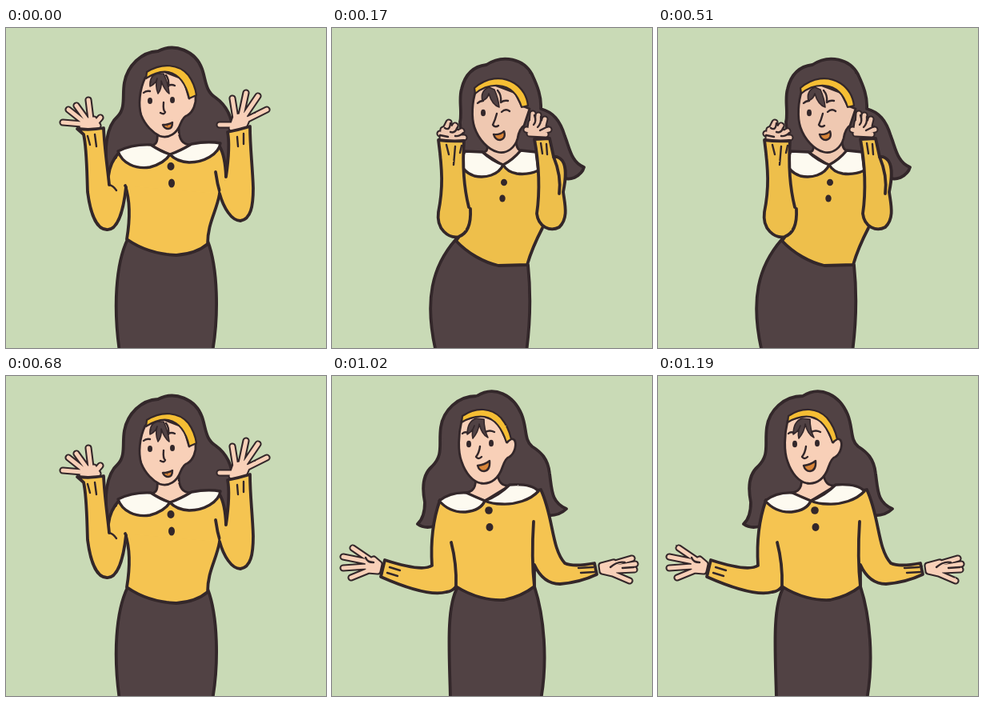
Write an HTML page that moves like this. It is 400 px wide and 400 px high and loops after 1360 ms.

```html
<!DOCTYPE html>
<html lang="en">
<head>
<meta charset="utf-8">
<title>Waving woman</title>
<style>
  html, body { margin: 0; height: 100%; overflow: hidden; background: #c9dab6; }
  svg { display: block; width: 100vw; height: 100vh; }
  path { stroke: #33272a; stroke-width: 3.8; stroke-linecap: round; stroke-linejoin: round; fill: none; }
  .dark { fill: #514244; }
  .yellow { fill: #f5c451; }
  .skin { fill: #f8d0b8; stroke-width: 2.8; }
  .collar { fill: #fdfaf0; stroke-width: 3.4; }
  .band { fill: #f5be34; stroke-width: 2.2; }
  .bangs { fill: #514244; stroke-width: 1.6; }
  .mouth { fill: #d98538; stroke-width: 2.4; }
  .thin { stroke-width: 2.4; }
  .plain { stroke: none; }
  .dot { fill: #33272a; stroke: none; }
  .finger { fill: #33272a; stroke-width: 9.2; }
  .flesh { fill: #f8d0b8; stroke: #f8d0b8; stroke-width: 5; }
  .muted .yellow { fill: #eebf4b; }
  .muted .skin, .muted .flesh { fill: #efc8b1; }
  .muted .flesh { stroke: #efc8b1; }
</style>
</head>
<body>
<svg viewBox="0 0 400 400">
  <filter id="rough" filterUnits="userSpaceOnUse" x="-10" y="-10" width="420" height="430" color-interpolation-filters="sRGB">
    <feTurbulence id="grain" type="fractalNoise" baseFrequency=".2" numOctaves="2" seed="1"/>
    <feDisplacementMap in="SourceGraphic" scale="1.4" xChannelSelector="R" yChannelSelector="G"/>
  </filter>
  <g id="stage" filter="url(#rough)"></g>
</svg>
<script>
const shape = (type, d) => `<path class="${type}" d="${d}"/>`;
const hand = d => shape('finger', d) + shape('flesh', d);
const dot = (x, y, rx, ry = rx) => `<ellipse class="dot" cx="${x}" cy="${y}" rx="${rx}" ry="${ry}"/>`;

const openHands = [
  shape('dark', 'M190 29C169 30 152 47 148 68C145 84 150 99 140 110C126 122 121 150 128 188L274 190L283 130C283 108 273 95 262 87C249 79 250 65 245 51C237 29 211 18 190 29Z'),
  shape('skin', 'M189 128C190 141 189 146 181 147L206 159L231 146C221 146 216 140 216 126Z'),
  shape('skin', 'M174 62C167 77 165 96 169 109C174 122 184 131 192 135C204 139 214 131 218 120Q222 110 227 109C234 105 238 94 237 85Q232 81 229 88L222 64L196 54Z'),
  shape('band', 'M176 55C195 43 216 45 228 59Q236 70 238 84L229 88C225 70 216 58 203 55Q190 53 175 63Z'),
  shape('bangs', 'M189 57Q179 60 180 73Q187 70 189 63Q186 72 190 82Q195 76 194 66Q198 78 204 82Q203 70 197 57Z'),
  shape('thin', 'M200 59Q204 64 203 73M172 81Q175 78 180 79M203 72Q207 70 211 72M197 93Q196 103 199 105Q198 109 193 106'),
  dot(180, 91, 3, 4), dot(208, 90, 3, 4),
  shape('mouth', 'M196 121Q203 121 208 118Q208 126 203 126Q198 126 196 121Z'),
  shape('dark', 'M152 264C137 295 134 350 142 405H258C266 360 265 300 252 266Z'),
  shape('yellow plain', 'M141 156Q131 168 129 186L130 204L151 202L267 208L275 187Q273 160 267 148L205 160Z'),
  shape('yellow', 'M149 197C155 215 155 240 151 264C168 276 190 283 213 284Q238 282 252 270C252 244 263 230 267 207'),
  shape('', 'M141 156Q130 168 128 185M267 148Q274 160 275 186M262 180Q264 195 268 208'),
  shape('collar', 'M205 158Q198 169 180 174C162 177 145 169 140 154Q158 145 181 146Q193 154 205 158Z'),
  shape('collar', 'M205 158Q217 154 232 145Q252 141 268 144C266 158 247 168 229 168Q213 167 205 158Z'),
  dot(206, 173, 4.5, 5), dot(207, 194, 4, 5.5),
  hand('M95 120L71 118M97 117L78 102M101 115L88 97M106 114L103 90M112 119L118 112M95 123L101 115L110 114L115 122Z'),
  hand('M284 121L267 121M287 113L283 88M294 109L300 81M298 110L315 85M300 115L326 102M282 125L287 111L297 109L301 115L298 122Z'),
  shape('yellow', 'M150 199C147 227 140 253 126 252C112 252 105 228 102 205C101 178 101 150 97 133L89 126Q106 128 122 125C123 150 127 175 129 196'),
  shape('yellow', 'M267 207C272 225 282 241 293 241C306 239 309 223 309 200C308 170 305 150 305 123Q292 127 277 130C280 145 278 165 275 186'),
  shape('thin', 'M129 196Q134 197 138 203M102 135L105 146M111 133L113 148M289 136L290 148M297 132L297 145')
].join('');

const wink = [
  shape('dark', 'M193 46C176 48 166 59 162 76C158 90 163 104 160 118L163 160L280 164L287 185Q293 191 303 187Q313 182 315 174C299 168 297 150 291 135C285 115 276 105 261 101C262 86 257 73 250 58C240 39 214 32 193 46Z'),
  shape('skin', 'M192 138Q198 156 188 155L214 172L238 154Q230 153 230 140Z'),
  shape('skin', 'M180 78C175 92 174 112 178 124C183 139 195 152 207 155C219 158 229 149 232 138Q234 126 240 122L247 101L237 97L229 81L200 70Z'),
  shape('band', 'M178 75C193 62 212 59 228 69Q243 79 245 97L237 99C232 82 222 73 208 72Q192 71 179 82Z'),
  shape('bangs', 'M196 74Q185 79 188 91Q195 88 196 82Q200 96 209 99Q208 88 203 77Z'),
  shape('thin', 'M207 78Q212 84 211 92M182 94Q185 91 189 91M211 93Q215 90 220 91M206 107Q204 115 201 121Q204 125 208 122M212 105Q217 100 222 104'),
  dot(189, 106, 3, 4.3),
  shape('mouth', 'M202 133Q210 134 215 129Q218 138 210 140Q204 140 202 133Z'),
  shape('dark', 'M155 264C125 298 115 340 130 405H243C249 360 248 325 245 296Z'),
  shape('yellow plain', 'M163 162L171 222Q172 245 155 266C170 282 190 295 208 297L244 296Q252 275 264 248L259 158L214 173Z'),
  shape('', 'M171 238Q166 252 155 266C170 282 190 293 208 297L244 296Q250 275 263 250'),
  shape('collar', 'M214 171C208 184 192 188 178 185Q162 179 161 167L166 154L188 155Q200 166 214 171Z'),
  shape('collar', 'M214 171Q226 165 236 153L255 155L258 178Q245 184 231 182Q219 180 214 171Z'),
  dot(215, 193, 4, 4.3), dot(213, 213, 3.7, 4.6),
  hand('M142 126L146 118M150 128L154 122M157 132L162 129M145 136L135 132M154 137L165 137M138 138L139 127L147 124L158 132L160 138Z'),
  shape('thin', 'M141 125Q147 129 148 119M148 130Q154 132 157 124M154 135Q159 136 164 131M135 134L145 136'),
  hand('M250 121L251 107M257 119L258 109M264 122L266 114M266 128L271 127M250 129L243 127M247 132L249 118L263 119L267 133Z'),
  shape('thin', 'M253 109Q256 117 252 121M261 111Q262 119 257 124M270 123L260 128'),
  shape('yellow', 'M171 224C165 200 163 170 165 141Q147 142 133 140C138 178 139 200 133 230C130 252 146 263 158 261C170 257 174 245 173 226'),
  shape('yellow', 'M253 139C259 170 260 205 256 232C258 249 273 255 284 249C296 238 291 220 289 205C292 190 294 175 288 166Q283 160 277 161L272 138Z'),
  shape('', 'M277 161Q287 185 284 207'),
  shape('thin', 'M143 146L146 158M154 148L152 171M162 147L160 156M261 144L263 157M268 145L269 158')
].join('');

const welcome = [
  shape('dark', 'M181 25C157 25 139 43 136 64C133 86 140 98 125 113C112 124 113 143 116 158Q116 177 107 185Q115 191 127 188L266 174Q283 176 293 166C274 158 275 143 272 122C270 103 261 95 250 88C240 80 244 65 237 48C227 24 203 11 181 25Z'),
  shape('skin', 'M179 125Q182 145 166 146L191 156L222 137Q208 138 207 122Z'),
  shape('skin', 'M162 56C158 73 157 94 162 107C167 122 176 132 186 134C199 136 209 127 213 114Q217 102 222 101C229 96 231 85 228 80Q223 76 219 83L207 57L186 49Z'),
  shape('band', 'M163 50C181 38 199 40 211 52Q221 64 224 79L218 83C213 66 203 53 191 51Q176 49 162 58Z'),
  shape('bangs', 'M180 53Q169 57 169 73Q176 69 178 62Q174 70 176 78Q183 70 184 60Q187 73 195 77Q190 67 190 54Z'),
  shape('thin', 'M163 72Q166 69 170 71M192 70Q197 67 203 70M185 88Q184 96 180 101Q183 105 187 101'),
  dot(171, 85, 3, 4.3), dot(199, 84, 3, 4.3),
  shape('mouth', 'M182 112Q191 111 197 106Q198 118 190 119Q184 119 182 112Z'),
  shape('dark', 'M157 264C142 290 147 350 148 405H261C270 355 265 300 253 263Z'),
  hand('M48 230L26 215M44 232L14 226M43 238L14 240M46 243L24 252M44 233L52 229L59 235L57 244L45 243Z'),
  shape('thin', 'M42 227Q44 233 52 233'),
  hand('M351 235L375 228M355 239L379 235M356 243L378 242M351 247L372 256M337 237L352 233L356 240L351 247L338 244Z'),
  shape('thin', 'M348 239Q357 231 366 233M363 240L377 239'),
  shape('yellow', 'M135 155C126 180 123 205 125 237Q112 245 66 230L61 251C95 266 125 275 143 270Q151 269 155 263C175 276 198 281 215 280Q238 275 253 263L253 236Q264 260 285 260Q310 258 331 248L328 234Q302 239 291 234C274 215 277 176 261 142L191 156Z'),
  shape('', 'M149 208Q156 235 155 263M252 182Q249 228 253 263'),
  shape('collar', 'M191 156Q186 168 167 170Q147 171 134 156Q148 145 168 146Q179 151 191 156Z'),
  shape('collar', 'M191 156Q209 149 222 136Q249 134 258 144C248 155 229 161 212 160Q200 160 191 156Z'),
  dot(196, 168, 4.8), dot(197, 189, 4.5, 5),
  shape('thin', 'M72 239L85 243M69 246L82 250M308 240L326 239M311 246L328 245')
].join('');

// The middle drawing of each held pose is redrawn with a different wobble.
const beats = [
  { art: openHands, seed: 1 },
  { art: wink, seed: 2, muted: true },
  { art: wink, seed: 7, muted: true, widen: 1.035 },
  { art: wink, seed: 2, muted: true },
  { art: openHands, seed: 1 },
  { art: welcome, seed: 4 },
  { art: welcome, seed: 9 },
  { art: welcome, seed: 4 }
];
const BEAT = 170, CENTER = 212;
const stage = document.getElementById('stage');
const grain = document.getElementById('grain');
const start = performance.now();
let current;

function draw(now) {
  const index = Math.floor(Math.max(0, now - start) / BEAT) % beats.length;
  if (index !== current) {
    current = index;
    const { art, seed, muted, widen = 1 } = beats[index];
    const shift = CENTER * (1 - widen);
    grain.setAttribute('seed', seed);
    stage.innerHTML = `<g class="${muted ? 'muted' : ''}" transform="translate(${shift} 0) scale(${widen} 1)">${art}</g>`;
  }
  requestAnimationFrame(draw);
}
draw(start);
</script>
</body>
</html>
```
